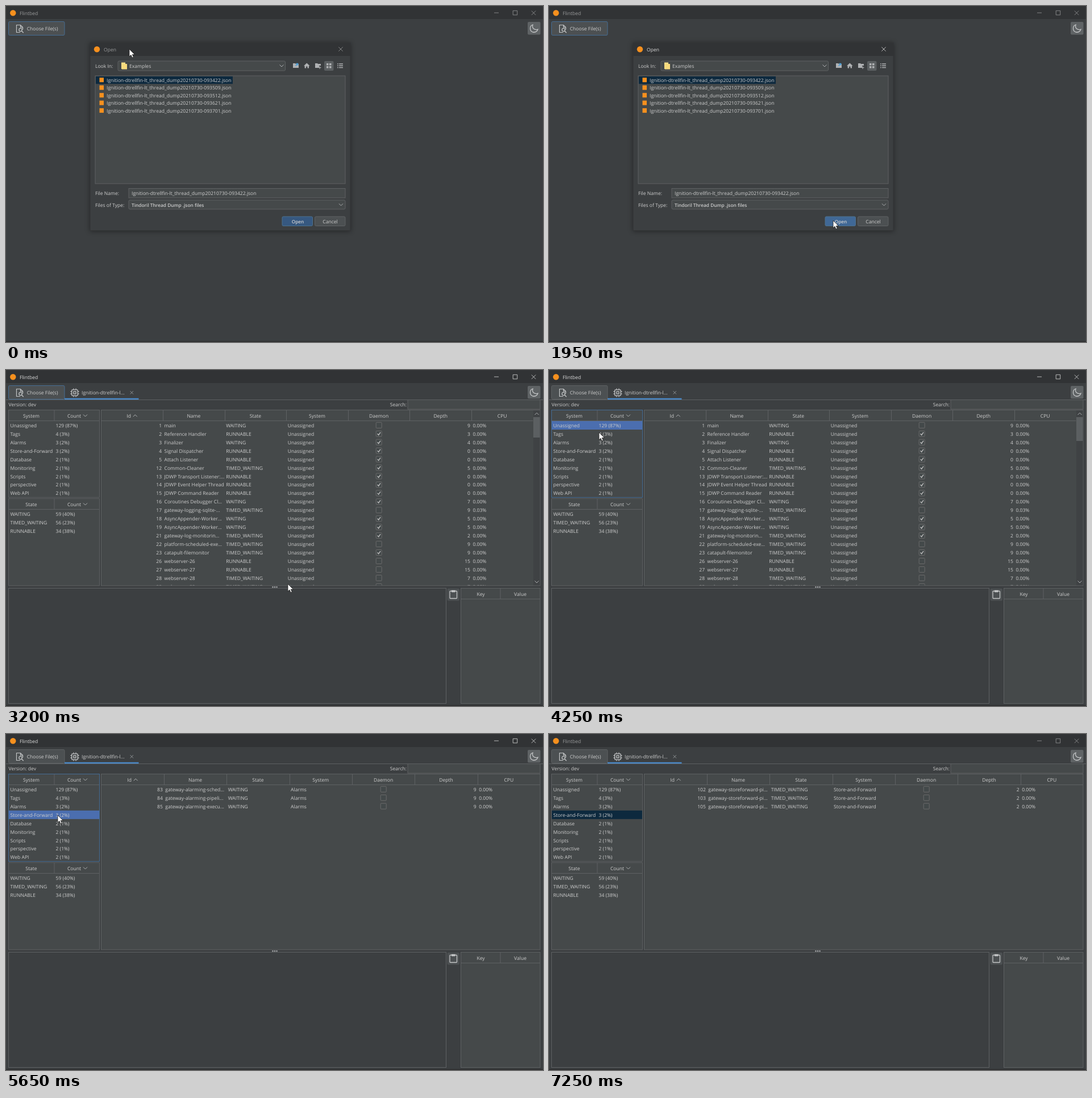
These frames come from a looping animation (945x592 px, 7.35 s). An HTML page:

```html
<!DOCTYPE html>
<html lang="en">
<head>
<meta charset="utf-8">
<title>Thread viewer</title>
<style>
  html, body { margin: 0; width: 100%; height: 100%; overflow: hidden; background: #3c3f41; }
  svg { display: block; }
  text {
    font: 8.55px "Open Sans", "Noto Sans", sans-serif;
    fill: #cdcdcd;
    text-rendering: geometricPrecision;
    white-space: pre;
  }
  .bold { font-size: 8.3px; font-weight: 600; }
  .active { --title: #dcdcdc; }
  .inactive { --title: #9a9b9c; }
  .title { fill: var(--title); }
  .control { stroke: var(--title); stroke-width: .8; fill: none; }
</style>
</head>
<body>
<svg id="stage" width="945" height="592" viewBox="0 0 945 592"></svg>
<script>
const LOOP = 7350, STEP = 50, ROW = 14.95;
const BG = '#3c3f41', FIELD = '#45494a', LINE = '#5e6163', BAR = '#313335',
      BUTTON = '#4c5052', FOCUS = '#466d94', ICON = '#afb1b3', ORANGE = '#f7901e';

// Drawing helpers; boxes take their outer edges, text its vertical centre
const text = (x, y, s, anchor = 'start', cls = '') =>
  `<text x="${x}" y="${y + 3.1}" text-anchor="${anchor}" class="${cls}">${s}</text>`;
const rect = (x, y, x2, y2, fill, stroke = 'none', rx = 0, extra = '') =>
  `<rect x="${x}" y="${y}" width="${x2 - x}" height="${y2 - y}" fill="${fill}" stroke="${stroke}" rx="${rx}" ${extra}/>`;
const path = (d, stroke = ICON, width = 1, fill = 'none') =>
  `<path d="${d}" stroke="${stroke}" stroke-width="${width}" fill="${fill}"/>`;
const line = (x, y, x2, y2) => path(`M${x} ${y}L${x2} ${y2}`, LINE);
const dot = (x, y, r, fill) => `<circle cx="${x}" cy="${y}" r="${r}" fill="${fill}"/>`;
const chevron = (x, y, dir = 1) => path(`M${x - 3.5} ${y - 2 * dir}l3.5 ${3.5 * dir}l3.5 ${-3.5 * dir}`);
const cross = (x, y, r) => `M${x - r} ${y - r}l${2 * r} ${2 * r}m0 ${-2 * r}l${-2 * r} ${2 * r}`;
const group = (id, body, extra = '') => `<g id="${id}" ${extra}>${body}</g>`;

function frameWindow() {
  return rect(0, 0, 945, 23, BAR) + dot(12.3, 12.3, 5.2, ORANGE) +
    text(24, 12.5, 'Flintbed', 'start', 'title') +
    `<path class="control" d="M859 12h8M892.2 8.3h7.500v7.500h-7.500z${cross(928.5, 12.2, 3.7)}"/>` +
    rect(0, 590, 945, 592, '#303132');
}

function toolbar() {
  return rect(4.5, 27.5, 103, 51.5, BUTTON, LINE, 2, 'id="choose"') +
    path('M25 46.5h-6.500v-13h7l4 4v4M25.500 33.500v4h4', '#c4c6c7', 1.2) +
    `<circle cx="25.500" cy="42" r="2.700" fill="none" stroke="#c4c6c7" stroke-width="1.200"/>` +
    path('M27.500 44l3.200 3.200', '#c4c6c7', 1.3) +
    text(36.7, 40.3, 'Choose File(s)') +
    rect(918, 28, 940.5, 50.5, '#5f6365', 'none', 2) +
    path('M927 33c-6 2-6 11 0 13c4 1 8-1 9-5c-6 2-11-2-9-8z', '#c4c6c7', 1.3);
}

function fileDialog() {
  const files = ['093422', '093509', '093512', '093621', '093701']
    .map(n => `Ignition-dtrellfin-lt_thread_dump20210730-${n}.json`);
  return rect(148, 64.5, 606, 395.5, BG, '#333536', 0, 'style="filter:drop-shadow(0 1px 4px #0006)"') +
    rect(148, 65, 606, 88, BAR) + dot(160, 76.3, 5.2, ORANGE) +
    text(172, 76.6, 'Open', 'start', 'title') +
    `<path class="control" d="${cross(589, 76, 3.7)}"/>` +
    text(157, 105.8, 'Look In:') +
    rect(197, 97, 491.5, 114, FIELD, LINE, 2) +
    rect(203, 99.5, 210, 111, '#ffe088') + rect(204, 102, 213, 111.5, '#f7da7c') +
    text(217, 105.8, 'Examples') + chevron(485, 105.5) +
    path('M505 101h4l1 1h5v7h-10z', 'none', 0, ICON) +
    path('M509.500 105.500l4-4m-3 0h3v3', '#4a9fd8', 1.6) +
    path('M524 105.500l5.300-5l5.300 5h-1.600v4h-2.500v-3h-2.400v3h-2.500v-4z', 'none', 0, ICON) +
    path('M544 101h4l1 1h5v3h-3v4h-7zM551.500 106h1v2h2v1h-2v2h-1v-2h-2v-1h2z', 'none', 0, ICON) +
    rect(560, 97, 576.5, 114, '#5b5f61', 'none', 2) +
    path('M564 101h3.500v3.500h-3.500zm5 0h3.500v3.500h-3.500zm-5 5h3.500v3.500h-3.500zm5 0h3.500v3.500h-3.500z', 'none', 0, ICON) +
    path('M583 102h1.800m1.200 0h7m-10 3.300h1.800m1.200 0h7m-10 3.300h1.800m1.200 0h7', ICON, 1.5) +
    rect(157, 123, 597, 313, FIELD, LINE) + rect(158, 124, 399, 137.2, '#0d293e') +
    files.map((f, i) => {
      const y = 130.6 + 13.45 * i;
      return rect(164.5, y - 4.3, 172, y + 3.7, ORANGE) + text(177, y, f);
    }).join('') +
    text(157, 330, 'File Name:') + rect(216, 321.5, 597, 338, FIELD, LINE) + text(221, 330, files[0]) +
    text(157, 350.5, 'Files of Type:') + rect(216, 342, 597, 358, FIELD, LINE, 2) +
    text(221, 350.5, 'Tindoril Thread Dump .json files', 'start', 'bold') + chevron(589.5, 350.3) +
    rect(486, 371, 539.5, 387.5, '#365880', '#4c708c', 2, 'id="open"') +
    text(513.5, 379.5, 'Open', 'middle', 'bold') +
    rect(543.5, 371, 597, 387.5, BUTTON, LINE, 2) + text(570.5, 379.5, 'Cancel', 'middle');
}

// Two-column summary list
function summary(y, bottom, title, rows, id) {
  return rect(4.5, y, 164.5, bottom, FIELD, LINE, 0, `id="${id}"`) +
    line(85, y, 85, y + 19) + line(5, y + 19, 164, y + 19) +
    (id === 'systems' ? rect(5, 90, 164, 105, '#4b6eaf', 'none', 0, 'id="pick"') : '') +
    text(44.5, y + 10, title, 'middle') + text(120, y + 10, 'Count', 'middle') + chevron(139.5, y + 10) +
    rows.map(([a, b], i) => text(7.5, y + 27.2 + ROW * i, a) + text(87.5, y + 27.2 + ROW * i, b)).join('');
}

function checkbox(x, y, on) {
  return rect(x - 4.8, y - 5, x + 5.2, y + 5, '#43494a', '#6b6b6b', 1) +
    (on ? path(`M${x - 2.4} ${y}l2 2.300l3.400-4.800`, '#bbb', 1.4) : '');
}

// Thread table; the columns share the width evenly
function threads(id, rows, scroll) {
  const w = (scroll ? 760 : 772.5) / 7, col = i => 167.5 + i * w;
  const heads = ['Id', 'Name', 'State', 'System', 'Daemon', 'Depth', 'CPU'];
  let out = line(168, 89.5, col(7), 89.5);
  heads.forEach((h, i) => {
    const x = col(i + .5);
    out += text(i ? x : x - 5.5, 80.6, h, 'middle');
    if (i) out += line(Math.round(col(i)) + .5, 71, Math.round(col(i)) + .5, 89);
    else out += chevron(x + 5.5, 80.3, -1);
  });
  rows.forEach(([num, name, state, system, daemon, depth, cpu], i) => {
    const y = 97.7 + ROW * i;
    out += text(col(1) - 2, y, num, 'end') + text(col(1) + 2.5, y, name) +
      text(col(2) + 2.5, y, state) + text(col(3) + 2.5, y, system) +
      checkbox(Math.round(col(4.5)), y - .4, daemon) +
      text(col(6) - 2, y, depth, 'end') + text(col(6) + 2.5, y, cpu || '0.00%');
  });
  if (scroll) out += rect(928, 71, 939.5, 379.5, '#3f4244') +
    rect(928, 83, 939.5, 119, '#5b5f61', 'none', 0, 'id="thumb"') +
    chevron(934, 77, -1) + chevron(934, 373.5);
  return group(id, out, 'clip-path="url(#tableClip)"');
}

const STATES = { W: 'WAITING', R: 'RUNNABLE', T: 'TIMED_WAITING' };
// Each entry: id|name|state|daemon|depth|cpu
const parse = (list, system) => list.trim().split('\n').map(r => {
  const [id, name, state, daemon, depth, cpu] = r.trim().split('|');
  return [id, name, STATES[state], system, daemon === 'x', depth, cpu];
});

const all = parse(`
  1|main|W||9
  2|Reference Handler|R|x|3
  3|Finalizer|W|x|4
  4|Signal Dispatcher|R|x|0
  5|Attach Listener|R|x|0
  12|Common-Cleaner|T|x|5
  13|JDWP Transport Listener:...|R|x|0
  14|JDWP Event Helper Thread|R|x|0
  15|JDWP Command Reader|R|x|0
  16|Coroutines Debugger Cl...|W|x|7
  17|gateway-logging-sqlite-...|T||9|0.03%
  18|AsyncAppender-Worker...|W|x|5
  19|AsyncAppender-Worker...|W|x|5
  21|gateway-log-monitorin...|T|x|2
  22|platform-scheduled-exe...|T||9
  23|catapult-filemonitor|T|x|9
  26|webserver-26|R||15
  27|webserver-27|R||15
  28|webserver-28|T||7
  29|webserver-29|T||7`, 'Unassigned');
const tags = parse(`
  89|gateway-tags-eventscrip...|W|x|9
  90|gateway-tags-eventscrip...|W|x|9
  95|gateway.tags.subscriptio...|W|x|9
  101|gateway-tags-eventscrip...|W|x|9`, 'Tags');
const alarms = parse(`
  83|gateway-alarming-sched...|W||9
  84|gateway-alarming-pipeli...|W||9
  85|gateway-alarming-execu...|W||9`, 'Alarms');
const store = parse(`
  102|gateway-storeforward-pi...|T||2
  103|gateway-storeforward-pi...|T||2
  105|gateway-storeforward-pi...|T||2`, 'Store-and-Forward');

function viewer() {
  const systems = [['Unassigned', '129 (87%)'], ['Tags', '4 (3%)'], ['Alarms', '3 (2%)'],
    ['Store-and-Forward', '3 (2%)'], ['Database', '2 (1%)'], ['Monitoring', '2 (1%)'],
    ['Scripts', '2 (1%)'], ['perspective', '2 (1%)'], ['Web API', '2 (1%)']];
  const states = [['WAITING', '59 (40%)'], ['TIMED_WAITING', '56 (23%)'], ['RUNNABLE', '34 (38%)']];
  return line(0, 52.5, 945, 52.5) + rect(103, 49.7, 233.5, 52.1, '#4a88c7') +
    rect(115.8, 34.8, 126.2, 45.2, 'none', '#c4c6c7', 1, 'stroke-width="1.300"') +
    rect(119, 38, 123, 42, 'none', '#c4c6c7', 0, 'stroke-width="1.300"') +
    path('M119 32.500v2m4-2v2m-4 11v2m4-2v2M113.500 38h2m-2 4h2m11-4h2m-2 4h2', '#c4c6c7', 1.3) +
    text(133, 40.3, 'Ignition-dtrellfin-l...') + path(cross(221.3, 39.8, 2.7), '#8f9395') +
    text(4.5, 61.3, 'Version: dev') + text(705, 61.3, 'Search:', 'end') +
    rect(707, 52.5, 940, 69, FIELD, LINE) +
    summary(70.5, 224.5, 'System', systems, 'systems') +
    summary(226.5, 380, 'State', states, 'states') +
    rect(167.5, 70.5, 940, 380, FIELD, LINE) +
    threads('t0', all, true) + threads('t1', tags) + threads('t2', alarms) + threads('t3', store) +
    [469.5, 473, 476.5].map(x => dot(x, 382.4, 1.2, ICON)).join('') +
    rect(4.5, 384.5, 774.5, 587.5, BG, LINE) +
    rect(776.5, 385, 798, 406.5, BUTTON, 'none', 2) +
    rect(781, 389.5, 793.5, 402.5, 'none', '#c4c6c7', 1, 'stroke-width="1.300"') +
    rect(784, 388, 790.5, 391.5, '#c4c6c7') +
    rect(800.5, 384.5, 940, 587.5, FIELD, LINE) + line(870, 385, 870, 403) + line(801, 403.5, 940, 403.5) +
    text(835.5, 394.6, 'Key', 'middle') + text(905, 394.6, 'Value', 'middle');
}

const stage = document.getElementById('stage');
stage.innerHTML =
  `<clipPath id="tableClip"><rect x="167" y="71" width="773" height="308.500"/></clipPath>` +
  rect(0, 0, 945, 592, BG) + group('frame', frameWindow()) + toolbar() +
  group('viewer', viewer()) + group('dialog', fileDialog()) +
  group('cursor', path('M0 0v13l3-2.700l2 4.700l2.300-1l-2-4.500h4.200z', '#222', .8, '#fff'));

const $ = Object.fromEntries([...stage.querySelectorAll('[id]')].map(e => [e.id, e]));
const show = (el, on) => { el.style.display = on ? '' : 'none'; };
const activate = (el, on) => el.setAttribute('class', on ? 'active' : 'inactive');

// Pointer way-points: time, x, y
const pointer = [
  [0, 217, 76], [50, 330, 162], [100, 500, 290], [150, 583, 344], [300, 583, 344],
  [350, 555, 356], [450, 462, 380], [500, 443, 381], [650, 500, 378], [3150, 500, 378],
  [3200, 496, 377], [3250, 380, 280], [3300, 230, 155], [3350, 159, 110], [3500, 159, 110],
  [3600, 112, 105], [3700, 86, 104], [4200, 86, 104], [4250, 88, 110], [4750, 90, 115],
  [5000, 90, 115], [5050, 92, 131], [5200, 92, 132], [5350, 91, 143], [5650, 91, 143],
  [5750, 96, 230], [5850, 107, 354], [6050, 107, 354], [6200, 75, 496], [6300, 61, 550],
  [6400, 55, 575], [6550, 52, 594]
];
const picks = [[0, -1], [3900, 0], [4450, 1], [5150, 2], [5650, 3]];
const tables = [[0, 0], [4500, 1], [5200, 2], [5700, 3]];
const at = (steps, t) => steps.filter(s => s[0] <= t).pop()[1];

function pointerAt(t) {
  const i = pointer.findIndex(p => p[0] > t);
  if (i < 0) return pointer[pointer.length - 1].slice(1);
  const [a, b] = [pointer[i - 1], pointer[i]], k = (t - a[0]) / (b[0] - a[0]);
  return [1, 2].map(j => Math.round(a[j] + (b[j] - a[j]) * k));
}

function draw(now) {
  const t = Math.floor(now % LOOP / STEP) * STEP;
  const active = t >= 2050 && t < 7250, pick = at(picks, t), table = at(tables, t);
  activate($.frame, active);
  activate($.dialog, t >= 1950);
  show($.dialog, t < 2050);
  show($.viewer, t >= 2200);
  $.open.setAttribute('fill', t >= 1950 ? '#406896' : t >= 600 ? '#3c618d' : '#365880');
  $.choose.setAttribute('stroke', t < 3900 ? FOCUS : LINE);
  $.systems.setAttribute('stroke', pick >= 0 && active ? FOCUS : LINE);
  show($.pick, pick >= 0);
  $.pick.setAttribute('y', 90 + ROW * pick);
  $.pick.setAttribute('fill', active ? '#4b6eaf' : '#0d293e');
  [$.t0, $.t1, $.t2, $.t3].forEach((g, i) => show(g, i === table));
  $.thumb.setAttribute('height', t < 4000 ? 36 : 42);
  $.cursor.setAttribute('transform', `translate(${pointerAt(t)})`);
}

const start = performance.now();
function tick() {
  draw(performance.now() - start);
  requestAnimationFrame(tick);
}
tick();
</script>
</body>
</html>
```
